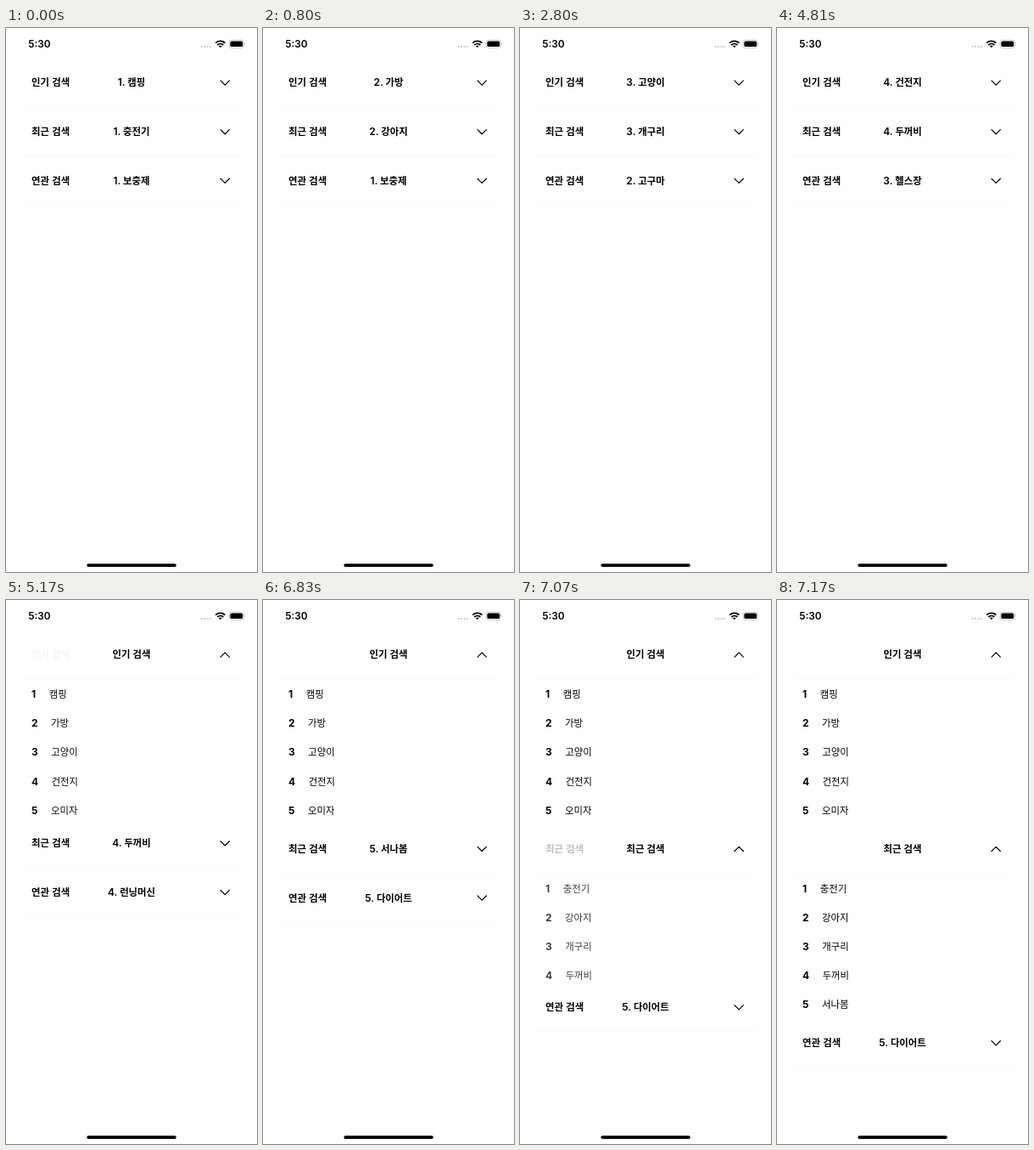
An HTML page for the animation above (8000 ms loop, 296 by 640 pixels).

```html
<!DOCTYPE html>
<html lang="ko">
<head>
<meta charset="utf-8">
<title>검색 순위</title>
<style>
  html, body { margin: 0; width: 100%; height: 100%; overflow: hidden; background: #fff; }
  svg { display: block; width: 296px; height: 640px; }
  text { font: 600 12px Inter, "Noto Sans CJK KR", sans-serif; }
  .ko { font: 600 11.4px "Noto Sans CJK KR", "Noto Sans CJK", sans-serif; }
  .name { font-weight: 400; }
  .num { font-weight: 700; }
  .mid { text-anchor: middle; }
  .line { fill: none; stroke: #000; stroke-width: 1.2; stroke-linecap: round; stroke-linejoin: round; }
</style>
</head>
<body>
<svg viewBox="0 0 296 640">
  <g id="rows"></g>

  <!-- status bar -->
  <text x="26.3" y="23.1" style="font-size:11.8px">5:30</text>
  <g fill="#c4c4c4">
    <circle cx="230.6" cy="22" r="1.05"/><circle cx="234" cy="22" r="1.05"/>
    <circle cx="237.4" cy="22" r="1.05"/><circle cx="240.8" cy="22" r="1.05"/>
  </g>
  <g fill="none" stroke="#000" stroke-width="1.8">
    <path d="M247.2 17.6a8.2 8.2 0 0 1 11.2 0"/>
    <path d="M249.3 20a5.1 5.1 0 0 1 7 0"/>
  </g>
  <path d="M250.9 21.3a2.8 2.8 0 0 1 3.8 0l-1.9 2z"/>
  <rect x="263" y="14.2" width="17.6" height="9.2" rx="2.8" fill="none" stroke="#bdbdbd" stroke-width=".8"/>
  <rect x="264.4" y="15.5" width="14.8" height="6.6" rx="1.7"/>
  <path d="M281.5 17.3q1.3 1.5 0 3z" fill="#bdbdbd"/>

  <!-- home indicator -->
  <rect x="95.3" y="630.2" width="105.5" height="3.8" rx="1.9"/>
</svg>

<script>
const LOOP = 8000;
const TOP = 64.25, PITCH = 57.7, ITEM = 34.15;
const OPEN_MS = 340;

// The screen refreshes only at these moments.
const TICKS = [0, 800, 2800, 4810, 4940, 5050, 5170, 6830, 6950, 7060, 7170];

// at: when each next keyword shows; open: when the list starts to unfold
const DATA = [
  { title: '인기 검색', words: ['캠핑', '가방', '고양이', '건전지', '오미자'],
    at: [800, 2800, 4810, 6830], open: 4870 },
  { title: '최근 검색', words: ['충전기', '강아지', '개구리', '두꺼비', '서나봄'],
    at: [800, 2800, 4810, 6830], open: 6830 },
  { title: '연관 검색', words: ['보충제', '고구마', '헬스장', '런닝머신', '다이어트'],
    at: [2800, 4810, 4940, 6830], open: Infinity }
];

const ko = s => `<tspan class="ko">${s}</tspan>`;

const item = (word, i) => {
  const y = 50.9 + ITEM * i;
  return `<text x="30" y="${y}"><tspan class="num">${i + 1}</tspan>` +
    `<tspan class="ko name" dx="15.5">${word}</tspan></text>`;
};

const rows = DATA.map(d => {
  const g = document.createElementNS('http://www.w3.org/2000/svg', 'g');
  // The white sheet hides whatever lies under the row.
  g.innerHTML = `
    <rect y="-27" width="296" height="640" fill="#fff"/>
    <path d="M18 28.4H280" stroke="#fafafa"/>
    <text class="title" x="30" y="4.2">${ko(d.title)}</text>
    <text class="mid" x="148" y="4.2"></text>
    <path class="line"/>
    <g class="list">${d.words.map(item).join('')}</g>`;
  document.getElementById('rows').append(g);
  const find = s => g.querySelector(s);
  return { ...d, g, left: find('.title'), mid: find('.mid'), arrow: find('.line'), list: find('.list') };
});

function ease(x) {
  x = Math.min(1, Math.max(0, x));
  return x * x * (3 - 2 * x);
}

function draw(now) {
  const time = now % LOOP;
  const t = TICKS.filter(k => k <= time).pop();
  let y = TOP;
  for (const r of rows) {
    const p = ease((t - r.open) / OPEN_MS);
    const n = r.at.filter(k => k <= t).length;
    const label = p > 0 ? ko(r.title) : `<tspan>${n + 1}. </tspan>${ko(r.words[n])}`;
    if (r.label !== label) r.mid.innerHTML = r.label = label;
    r.g.setAttribute('transform', `translate(0 ${y})`);
    r.left.setAttribute('opacity', 1 - p);
    r.list.setAttribute('opacity', p);
    r.arrow.setAttribute('d', p > 0 ? 'M253 2.8l5.2-5.2 5.2 5.2' : 'M253-2.4l5.2 5.2 5.2-5.2');
    y += PITCH + ITEM * r.words.length * p;
  }
}

const start = performance.now();
function frame() {
  draw(performance.now() - start);
  requestAnimationFrame(frame);
}
frame();
</script>
</body>
</html>
```
